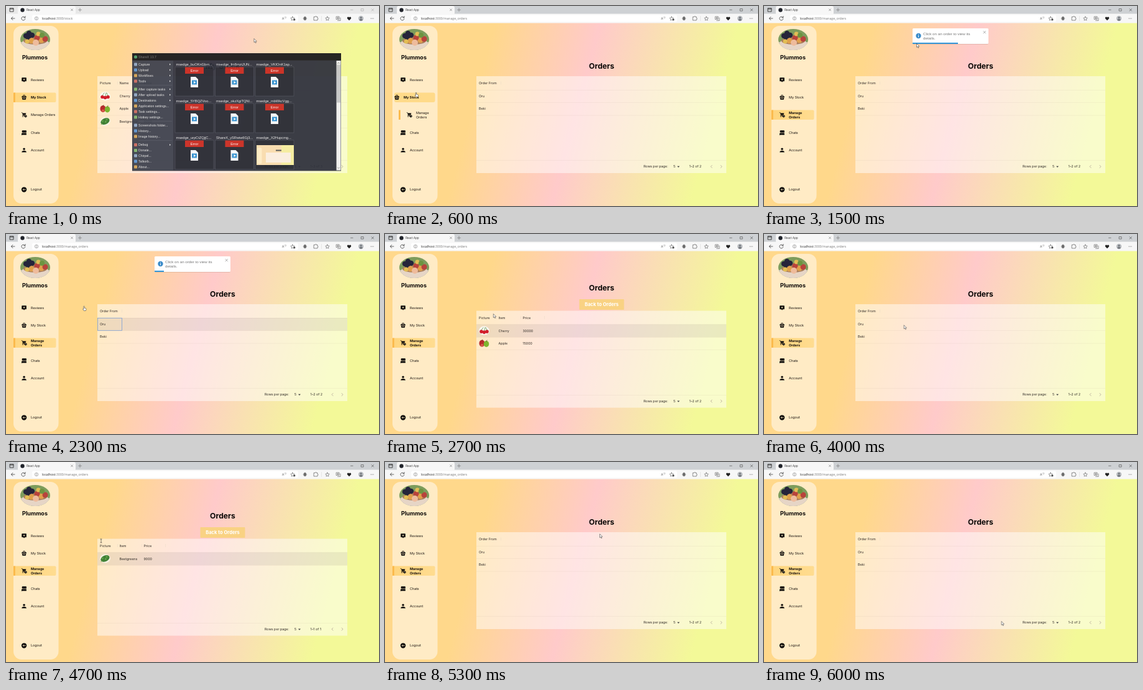
An HTML page that plays this animation: 600x322 px, repeating every 6100 ms.

```html
<!DOCTYPE html>
<html lang="en">
<head>
<meta charset="utf-8">
<title>Fruit shop orders</title>
<style>
  html, body { margin: 0; width: 100%; height: 100%; overflow: hidden; }
  svg { display: block; font-family: Inter, sans-serif; }
  .ui { font-family: "Open Sans", sans-serif; }
  .arial { font-family: "Liberation Sans", Arial, sans-serif; }
</style>
</head>
<body>
<svg id="stage" width="600" height="322" viewBox="0 0 600 322"></svg>
<script>
const LOOP = 6100, STEP = 100;

// --- drawing helpers -------------------------------------------------
const rect = (x, y, w, h, fill, rx = 0, extra = '') =>
  `<rect x="${x}" y="${y}" width="${w}" height="${h}" fill="${fill}" rx="${rx}" ${extra}/>`;
const dot = (x, y, r, fill, ry = r) => `<ellipse cx="${x}" cy="${y}" rx="${r}" ry="${ry}" fill="${fill}"/>`;
const dots = (fill, r, ...points) => points.map(([x, y]) => dot(x, y, r, fill)).join('');
const line = (d, color = '#333', w = .7) =>
  `<path d="${d}" fill="none" stroke="${color}" stroke-width="${w}" stroke-linecap="round" stroke-linejoin="round"/>`;
// y is the vertical middle of the capitals
const text = (x, y, s, size = 5.33, fill = '#2b2622', extra = '') =>
  `<text x="${x}" y="${y + size * .36}" font-size="${size}" fill="${fill}" ${extra}>${s}</text>`;
const group = (id, body, extra = '') => `<g id="${id}" ${extra}>${body}</g>`;
const at = (x, y, body, scale = 1) => `<g transform="translate(${x} ${y}) scale(${scale})">${body}</g>`;
const BOLD = 'font-weight="700" ', MID = 'text-anchor="middle"';

// --- sidebar ---------------------------------------------------------
const shape = d => `<path d="${d}" fill="#0c0a08"/>`;
const icons = {
  review: shape('M4 2h16a2 2 0 0 1 2 2v12a2 2 0 0 1-2 2h-5l-3 4-3-4H4a2 2 0 0 1-2-2V4a2 2 0 0 1 2-2z') +
    '<path d="M12 5l1.500 3.500L17 10l-3.500 1.500L12 15l-1.500-3.500L7 10l3.500-1.500z" fill="#ffecc6"/>',
  basket: line('M6 10l3-7h6l3 7', '#0c0a08', 2.5) + shape('M2 8h20v4H2zM3 13h18l-2 9H5z') +
    line('M8 16h8', '#ffecc6', 1.5),
  cart: shape('M1 2v2h2l3.600 7.600-1.400 2.500C4.500 15.400 5.500 17 7 17h8v-2H7.400l1.100-2H16c.75 0 1.400-.4 1.700-1L21 5.500H5.200L4.300 2z') +
    dot(7, 20, 2, '#0c0a08') + dot(18.5, 18, 5.5, '#0c0a08') + line('M18.500 15v3.500h2', '#ffecc6', 1.3),
  chat: shape('M5 2h15a2 2 0 0 1 2 2v7H6a3 3 0 0 1-3-3V4zM2 13h18a2 2 0 0 1 2 2v6H4l-3 2z'),
  person: dot(12, 7, 4.5, '#0c0a08') + shape('M2 21c0-5 5-7.500 10-7.500S22 16 22 21z'),
  logout: dot(12, 12, 11, '#0c0a08') + line('M18 12H8m3-4l-4 4 4 4', '#ffecc6', 2)
};
const icon = (name, y) => at(24.5, y - 4.5, icons[name], .38);
const item = (name, y, label, style) => icon(name, y) + text(40, y, label, 5.4, '#15110d', style);
const glow = y => rect(12, y - 7.5, 68.5, 15.5, 'url(#glow)', 2);
const bar = (x, y) => rect(x, y - 7.5, 2.8, 15.5, '#fbb94a');
const split = style => icon('cart', 175) + text(40, 172.2, 'Manage', 5.4, '#15110d', style) +
  text(40, 178.8, 'Orders', 5.4, '#15110d', style);

const photo = `<g clip-path="url(#oval)">${rect(22, 36, 50, 36, '#7d9c5c')}
  ${rect(22, 58, 50, 16, '#cfc6bd')}${dot(47, 61, 22, '#e6d5c6', 10)}${dot(47, 56, 19, '#a97d5c', 6)}
  ${dots('#25243a', 4.2, [32, 48], [37, 44], [36, 51], [42, 47])}${dots('#e0a04c', 4.5, [41, 56], [57, 55])}
  ${dots('#b8433c', 4.5, [50, 51], [63, 53])}${dots('#e2bd55', 3.5, [52, 45], [34, 57])}
  ${dot(48, 59, 5, '#eebb9c')}${dot(58, 47, 4, '#6d9440')}</g>`;

const sidebar = rect(12, 32, 72.5, 286, '#fff', 13, 'opacity=".5"') + photo +
  text(46.5, 82.5, 'Plummos', 9, '#0b0907', BOLD + MID) +
  item('review', 119, 'Reviews') + item('chat', 204, 'Chats') +
  item('person', 232, 'Account') + item('logout', 295.5, 'Logout') +
  group('navStock', glow(147) + bar(12, 147) + item('basket', 147, 'My Stock', BOLD) + item('cart', 175, 'Manage Orders')) +
  group('navMove', rect(15, 139.5, 65.5, 15.5, '#ffda89', 3) +
    group('leaving', item('basket', 147, 'My Stock', BOLD)) + group('entering', bar(12, 175) + split(''))) +
  group('navOrders', glow(175) + bar(12, 175) + item('basket', 147, 'My Stock') + split(BOLD));

// --- tables ----------------------------------------------------------
const pics = {
  Cherry: dot(8.5, 7, 8.5, '#fbf8f2', 7) + dots('#d21f2b', 2.8, [4, 8.5], [8.5, 9.5], [13, 8.5]) +
    line('M4 6l3-4M9 7l1-5M13 6l-2-4', '#4d8a3a', .7),
  Apple: dot(5, 7, 4.5, '#b82b2b', 5.5) + dot(12, 8, 4.3, '#7db52f', 5) +
    line('M5 3l1-2M12 4l1-2', '#5c3b20', .7) + dot(5, 10, 2.5, '#d8574a', 2),
  Beetgreens: dot(8.5, 7, 8.5, '#f6f2e2', 7) +
    `<g transform="rotate(-25 8 7)">${dot(8.5, 7, 7.5, '#3f8035', 4.8)}${dots('#63a34b', 1.5, [5, 5], [9, 8], [12, 5.5])}</g>` +
    line('M4 10l-2 2', '#6a9a40', 1)
};
const cols = [151, 182.5, 221.5];
const rule = y => rect(147, y, 402, .5, 'rgba(150,130,110,.15)');
const shade = y => rect(147, y, 402, 20.5, 'rgba(95,80,90,.1)');

function table(y, heads, rows, count, picked) {
  let s = rect(147, y, 402, 156, 'rgba(255,255,255,.5)') + rule(y + 22) + rule(y + 135.5);
  heads.forEach((h, i) => {
    s += text(cols[i], y + 11, h) + rect((cols[i + 1] || 260) + (heads.length < 2 ? 4 : -3.5), y + 8.5, .5, 5, '#e6d9c6');
  });
  if (picked) s += shade(y + 22);
  rows.forEach((row, r) => {
    const mid = y + 32 + r * 20.4;
    row.forEach((cell, i) => {
      s += heads[i] === 'Picture' ? at(cols[i], mid - 7, pics[cell]) : text(cols[i], mid, cell);
    });
    s += rule(mid + 10.4);
  });
  const foot = y + 145.5;
  return s + text(416, foot, 'Rows per page:') + text(464, foot - .3, 5) +
    `<path d="M470 ${foot - .7}h4l-2 2.300z" fill="#444"/>` + text(489.5, foot, `1–${count} of ${count}`) +
    line(`M526 ${foot - 2}l-2 2 2 2M540 ${foot - 2}l2 2-2 2`, '#b0a294', .8);
}
const title = (y, s) => text(348.5, y, s, 12.2, '#0b0907', BOLD + MID);
const details = (...goods) => title(86.5, 'Orders') + rect(312.5, 105, 72, 17, '#f9d283', 1) +
  text(348.5, 113, 'Back to Orders', 7.6, '#fff', BOLD + MID) +
  table(123.6, ['Picture', 'Item', 'Price'], goods, goods.length, true);

const cherry = ['Cherry', 'Cherry', 30000], apple = ['Apple', 'Apple', 15000], beet = ['Beetgreens', 'Beetgreens', 9000];
const picked = y => shade(y) + rect(147.5, y + .3, 39, 20, 'none', 0, 'stroke="#7c9fd6" stroke-width=".8"');
const pages =
  group('stock', title(97, 'My Stock') + table(113, ['Picture', 'Name', 'Price'], [cherry, apple, beet], 3)) +
  group('orders', title(97, 'Orders') + table(113, ['Order From'], [['Oru'], ['Beki']], 2)) +
  group('pick0', picked(135)) + group('pick1', picked(155.4)) +
  group('first', details(cherry, apple)) + group('second', details(beet));

// --- toast -----------------------------------------------------------
const toast = group('toast', rect(239, 37, 122, 25, 'rgba(90,60,30,.16)', 2) + rect(239, 36, 122, 25, '#fff', 1.5) +
  dot(248.5, 48, 4.2, '#3a8bc9') + rect(248, 47.3, 1, 3, '#fff') + dot(248.5, 45.8, .6, '#fff') +
  text(256, 44.7, 'Click on an order to view its', 6.2, '#777', 'class="arial"') +
  text(256, 52, 'details.', 6.2, '#777', 'class="arial"') +
  line('M353 40.500l3.500 3.500m0-3.500l-3.500 3.500', '#777', .6) +
  rect(239, 59, 122, 2, '#3498db', 0, 'id="progress"'));

// --- screenshot tool window -------------------------------------------
const menu = [
  [94, 'Capture', 1], [103, 'Upload', 1], [112, 'Workflows', 1], [121, 'Tools', 1],
  [134, 'After capture tasks', 1], [143, 'After upload tasks', 1], [152, 'Destinations', 1],
  [161, 'Application settings...'], [170, 'Task settings...'], [179, 'Hotkey settings...'],
  [192, 'Screenshots folder...'], [201, 'History...'], [210, 'Image history...'],
  [223.5, 'Debug', 1], [232.5, 'Donate...'], [241, 'Chirpel...'], [250, 'Talkorb...'], [259, 'About...']
];
const tints = ['#8fa6c4', '#5b93d0', '#d3a455', '#c9695f', '#7fb36d'];
const files = ['msedge_buOKnGbm', 'msedge_fm8mztJUN', 'msedge_VKIOnK1ap', 'msedge_5YBQZVoo', 'msedge_okzXgiTQNl',
  'msedge_mbWkcVgg', 'msedge_urpCtZQjjC', 'ShareX_ySRwiw6Gj3', 'msedge_X2Hupcmg'];

function thumb(name, i) {
  const x = 272 + i % 3 * 64.5, y = Math.floor(i / 3) * 59;
  const label = text(1.5, 5, name + '...', 5.7, '#eee') +
    rect(0, 9, 62, 47, '#262831', 0, 'stroke="#555a66" stroke-width=".5"');
  const failed = rect(16, 9.5, 30, 10.5, '#c92a20') + text(31, 14.5, 'Error', 5.7, '#fff', MID) +
    '<path d="M25 25h8l4 4v13H25z" fill="#f6f8fa"/>' + rect(27, 30.5, 8, 7, '#2f8fd0') +
    '<path d="M30 32l3.500 2-3.500 2z" fill="#fff"/>';
  const preview = rect(2, 17, 60, 32, '#f9dcae') + rect(42, 17, 20, 32, '#f5ec9e') + rect(3.5, 21, 7, 26, '#ffecc6', 2) +
    rect(17, 29, 40, 16, '#fbeee0') + rect(33, 24.5, 9, 2, '#555');
  return at(x, 89 + y, label + (i === 8 ? preview : failed));
}
const tool = group('tool', rect(203, 76, 336, 189.5, '#30323d') + rect(203, 76, 336, 11.5, '#1b1a1c') +
  dot(208.5, 82, 2.6, '#4b9c6c') + text(213, 82, 'ShareX 13.7', 5.2, '#777') +
  rect(204, 88, 65, 176.5, '#3e424e') +
  menu.map(([y, label, sub], i) => rect(206, y - 2.5, 5, 5, tints[i % 5], 1) + text(213, y, label, 5.2, '#e6e6e6') +
    (sub ? `<path d="M263 ${y - 1.5}l2 1.500-2 1.500z" fill="#ddd"/>` : '')).join('') +
  [127.5, 185.5, 216.5].map(y => rect(213, y, 54, .5, '#5a5f6b')).join('') +
  files.map(thumb).join('') + rect(531.5, 88, 7, 176.5, '#f0f0f0') + rect(532, 94.5, 6, 61, '#c6c6c8') +
  line('M533.500 92.500l1.500-1.500 1.500 1.500M533.500 260l1.500 1.500 1.500-1.500', '#555', .6), 'class="arial" opacity=".94"');

// --- browser frame ---------------------------------------------------
const star = (x, y) => line(`M${x} ${y - 3}l1 2 2.200.3-1.600 1.600.4 2.200-2-1-2 1 .4-2.200-1.600-1.600 2.200-.3z`, '#444', .55);
const browser = group('browser', rect(0, 0, 600, 13, '#ced1d4', 0, 'id="strip"') + rect(0, 12.5, 600, 15, '#f7f7f7') +
  rect(19, 0, 93, 14, '#f7f7f7', 3) + rect(42, 14.5, 428, 11, '#fff', 3) +
  line('M6.500 3.500h5.500v5.500h-5.500zM6.500 5h5.500', '#222', .8) + dot(26.5, 6.5, 3.2, '#20232a') +
  text(33, 6.3, 'React App', 4.6, '#333') + line('M104.500 4.700l3 3m0-3l-3 3M116.500 6.200h5m-2.500-2.500v5', '#555', .5) +
  group('controls', line('M554.500 6.200h3.500M571.500 4.500h3.500v3.500h-3.500zM588 4.500l3.500 3.500m0-3.500l-3.500 3.500', '#222', .5)) +
  line('M14 20H8.500m2.300-2.500L8.500 20l2.300 2.500', '#333', .75) +
  line('M30.500 18.500a3 3 0 1 0 .4 2.200M31 16.500v2.300h-2.300', '#333', .75) +
  '<circle cx="49" cy="20" r="2.700" fill="none" stroke="#666" stroke-width=".5"/>' + line('M49 19.800v1.500M49 18.500v.1', '#555', .6) +
  `<text x="58" y="21.900" font-size="5.170" fill="#222">localhost<tspan id="path" fill="#777"></tspan></text>` +
  text(444, 20.2, 'A', 5.2, '#555') + line('M448.500 17.500q1 1 0 2M450 17q1.300 1.500 0 3', '#666', .4) +
  star(461, 20) + dot(464, 22, 1.4, '#444') +
  rect(478.7, 17.2, 4.4, 5.6, '#777', 1.5) + line('M478 20h6M481 17v6', '#555', .5) +
  line('M495.500 17.500h2a1 1 0 0 1 2 0h1.500v2a1 1 0 0 1 0 2v1.500h-5.500z', '#444', .6) + rect(507, 16, .4, 8, '#ccc') +
  star(517, 20) + line('M531.500 17h4.500v4.500h-4.500zM533.500 23.500h4.500v-4.500M533.700 18v2.500m-1.200-1.200h2.500', '#444', .55) +
  '<path d="M552 23.200l-3-3c-1-2.600 2-3.800 3-1.800 1-2 4-.8 3 1.800z" fill="#222"/>' +
  dot(571, 20, 4.2, '#b9bcc0') + dot(571, 18.7, 1.5, '#6f7479') + dot(571, 22.3, 2.6, '#6f7479', 1.5) +
  dots('#444', .5, [587, 20], [589, 20], [591, 20]), 'class="ui"');

// --- pointer ---------------------------------------------------------
const pointer = group('pointer',
  group('arrow', '<path d="M0 0v6l1.400-1.200 1 2.200 1-.4-1-2.200h1.900z" fill="#fff" stroke="#222" stroke-width=".5"/>') +
  group('hand', '<path d="M-.6-.5q.6-.8 1.200 0v2.600l2.300.6q.8.3.6 1.300l-.7 2.500H-.3L-2 4q0-.9 1.400 0z" fill="#fff" stroke="#222" stroke-width=".5"/>') +
  group('beam', line('M-1-3h.700l.3.3.3-.3h.700M0-2.700v5.200M-1 3h.700l.3-.3.3.3h.700', '#222', .6)));

document.getElementById('stage').innerHTML = `<defs>
  <linearGradient id="sky" gradientUnits="userSpaceOnUse" x1="-17" y1="90" x2="617" y2="260">
    <stop offset=".26" stop-color="#ffd88b"/><stop offset=".51" stop-color="#ffcaca"/><stop offset=".84" stop-color="#f3f998"/>
  </linearGradient>
  <linearGradient id="glow"><stop stop-color="#ffd57c"/><stop offset="1" stop-color="#ffdc90"/></linearGradient>
  <clipPath id="oval"><ellipse cx="47" cy="54" rx="24" ry="17"/></clipPath></defs>` +
  rect(0, 0, 600, 322, 'url(#sky)') + sidebar + pages + toast + browser + tool + pointer;

// --- motion ----------------------------------------------------------
const $ = id => document.getElementById(id);
const show = (id, on) => $(id).style.display = on ? '' : 'none';
const move = (id, x, y = 0) => $(id).setAttribute('transform', `translate(${x} ${y})`);
const within = (t, a, b) => t >= a && t < b;

function tween(keys, t) {
  const i = keys.findIndex(k => k[0] > t);
  if (i < 1) return (i ? keys[keys.length - 1] : keys[0]).slice(1);
  const [t0, ...a] = keys[i - 1], [t1, ...b] = keys[i];
  const p = (t - t0) / (t1 - t0), e = p * p * (3 - 2 * p);
  return a.map((v, n) => v + (b[n] - v) * e);
}
const route = [[0, 399, 52.5], [450, 52, 172], [600, 50, 140], [900, 120, 118], [1500, 245.5, 60.5], [2150, 160, 144],
  [2300, 125.5, 117], [2800, 180, 130], [3400, 217, 119.5], [3700, 345, 113], [4200, 160, 165],
  [4700, 153, 127], [5250, 345, 114], [6000, 382, 256.5]];
const slide = [[500, 0], [560, 10], [640, 10], [750, 0]];
const drop = [[820, -75], [960, 9], [995, -4], [1030, 2], [1053, 0], [2507, 0], [2560, -4], [2610, 8], [2750, -90]];

function draw() {
  const t = Math.floor(performance.now() % LOOP / STEP) * STEP;
  const page = t < 500 ? 'stock' : within(t, 2500, 3800) ? 'first' : within(t, 4500, 5300) ? 'second' : 'orders';
  ['stock', 'orders', 'first', 'second'].forEach(id => show(id, id === page));
  show('pick0', within(t, 2200, 2500));
  show('pick1', within(t, 4300, 4500));
  $('path').textContent = page === 'stock' ? ':3000/stock' : ':3000/manage_orders';

  // the browser is dimmed while the tool window has the focus
  const covered = t < 100;
  show('tool', covered);
  $('strip').setAttribute('fill', covered ? '#e8e8e8' : '#ced1d4');
  $('controls').setAttribute('opacity', covered ? .4 : 1);

  show('navStock', t < 500);
  show('navMove', within(t, 500, 750));
  show('navOrders', t >= 750);
  const [shift] = tween(slide, t);
  move('leaving', -shift);
  move('entering', shift);

  show('toast', within(t, 820, 2750));
  move('toast', 0, tween(drop, t)[0]);
  $('progress').setAttribute('width', 122 * Math.max(0, Math.min(1, (2507 - t) / 1683)));

  const kind = within(t, 4600, 4800) ? 'beam' :
    [[450, 700], [2100, 2400], [3600, 3800], [5200, 5300]].some(([a, b]) => within(t, a, b)) ? 'hand' : 'arrow';
  ['arrow', 'hand', 'beam'].forEach(id => show(id, id === kind));
  move('pointer', ...tween(route, t));
  requestAnimationFrame(draw);
}
draw();
</script>
</body>
</html>
```
